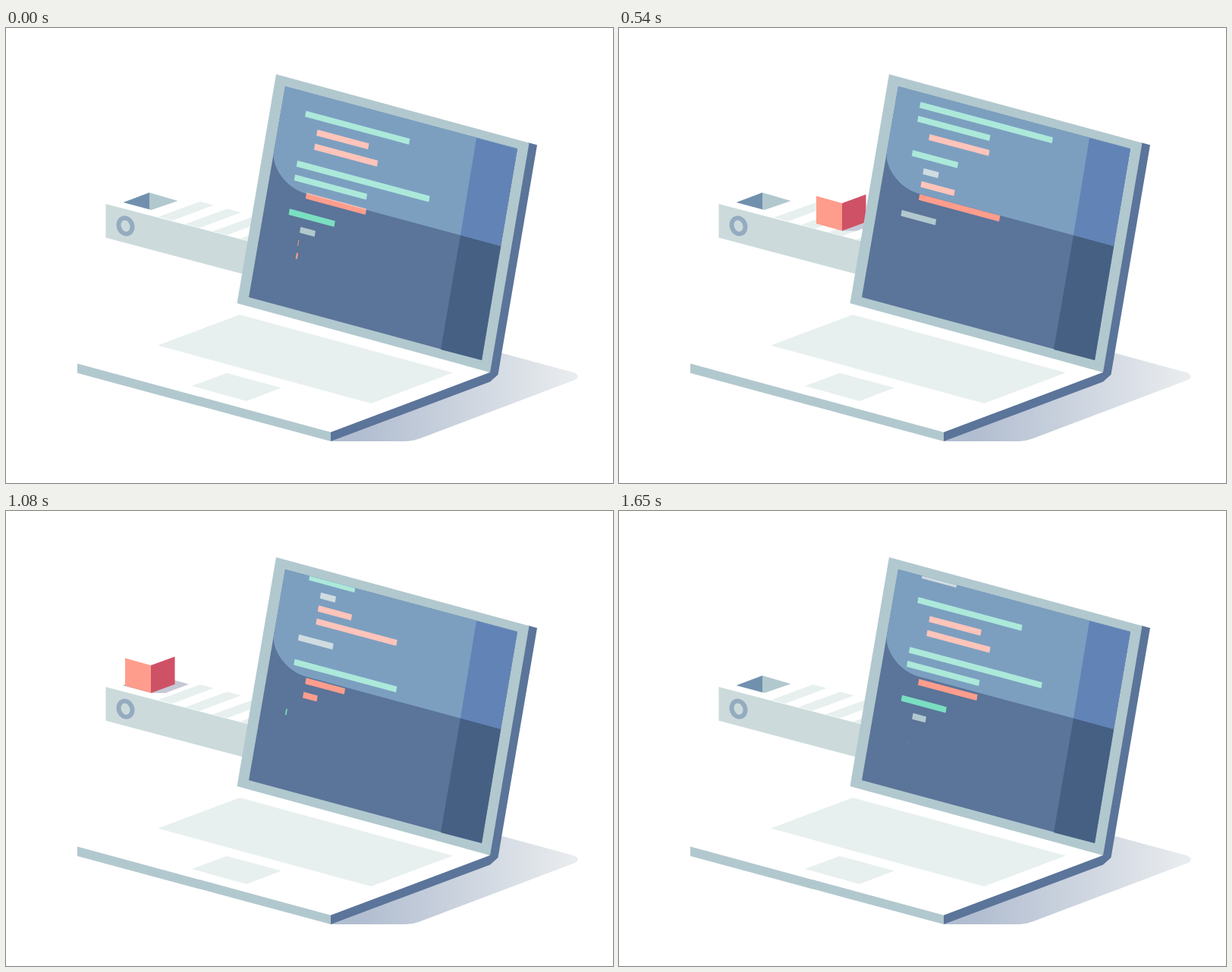
Write an HTML page that moves like this. It is 800 px wide and 600 px high and loops after 1.68 s.

```html
<!DOCTYPE html>
<html lang="en">
<head>
<meta charset="utf-8">
<title>Laptop and conveyor</title>
<style>
  html, body { margin: 0; width: 100%; height: 100%; overflow: hidden; background: #fff; }
  svg { display: block; width: 800px; height: 600px; }
</style>
</head>
<body>
<svg viewBox="0 0 800 600">
  <defs>
    <linearGradient id="fade" gradientUnits="userSpaceOnUse" x1="465" y1="0" x2="754" y2="0">
      <stop stop-color="#b1bdd0"/><stop offset="1" stop-color="#eaedef"/>
    </linearGradient>
    <clipPath id="beltClip"><path d="M255.5 228.5L345 252.500V288L318 281L199.500 249.500Z"/></clipPath>
    <clipPath id="holeClip"><path d="M155 100V230L191.500 240L226 228V100Z"/></clipPath>
    <clipPath id="screenClip"><path d="M368 77L674 159L627 438L320 355Z"/></clipPath>
    <clipPath id="glareClip"><path id="glareShape" d="M368 77L674 159L652 287.500L398 219C368 212 350 182 353 163Z"/></clipPath>
  </defs>

  <path fill="url(#fade)" d="M640 425L749 454.500Q758 459 750 464L545 541.500Q536 545 527 545H428Z"/>

  <!-- conveyor -->
  <path fill="#ccdadb" d="M131.500 232L330 284V329L131.500 276.500Z"/>
  <ellipse cx="157.500" cy="261" rx="8.700" ry="10.700" transform="rotate(-20 157.5 261)" fill="none" stroke="#94abc0" stroke-width="6"/>
  <g clip-path="url(#beltClip)"><path id="stripes" fill="#e7f0ef"/></g>
  <path fill="#b1c8ce" d="M189 217L226.500 228L191.500 240L188 239Z"/>
  <path fill="#7190ae" d="M154.500 230L189 217V239.300Z"/>
  <g id="cubeFrame">
    <path id="cubeShadow" fill="#c6c8d5"/>
    <g id="cube">
      <path fill="#fff" d="M157 194L189 182.500L222.500 192L191 203.500Z"/>
      <path fill="#ff9d8c" d="M157 194L191 203.500V240L157 230.500Z"/>
      <path fill="#cf5166" d="M191 203.500L222.500 192V228.500L191 240Z"/>
    </g>
  </g>

  <!-- laptop -->
  <path fill="#5b7499" d="M688 151L700 154.300L648.500 457L638 466.500L428 545V532L636 453Z"/>
  <path fill="#fff" d="M304.500 363L638 454L428 533L94 443Z"/>
  <path fill="#b1c8ce" d="M94 442.500L428 533V545L94 455Z"/>
  <path fill="#e7f0ef" d="M308 378L589 454.500L481 495L200 418.500ZM291 455L363 474.500L317 492L245 472Z"/>
  <path fill="#b1c8ce" d="M356 61L689.500 151.500L638 454L304.500 363Z"/>
  <path fill="#5b7499" d="M368 77L674 159L627 438L320 355Z"/>
  <use href="#glareShape" fill="#7c9fc0"/>
  <path fill="#6283b6" d="M620 145L674 159.500L652 287.500L599 273Z"/>
  <path fill="#456083" d="M599 273L652 287.500L627 438L573 424Z"/>
  <g clip-path="url(#screenClip)"><g id="bars"></g></g>
  <g clip-path="url(#screenClip)"><g clip-path="url(#glareClip)"><use href="#glareShape" fill="#7c9fc0"/><path fill="#6283b6" d="M620 145L674 159.500L652 287.500L599 273Z"/><g id="glareBars"></g></g></g>
</svg>
<script>
const LOOP = 1680, STEP = 30;
const SLOPE = 0.268;
const LIST_HEIGHT = 240.8, SCROLL = LIST_HEIGHT / LOOP;
const STRIPE_PERIOD = 36;

// [dark-area colour, light-area colour]
const GREEN = ['#7adfc1', '#ace9da'];
const PINK = ['#ff9d8c', '#ffc4ba'];
const GREY = ['#b1c8ce', '#cfdce0'];

// x, y at time 0, full width, colours, growth start, growth duration
const LINES = [
  [31.5, 23.8, 137, GREEN, 645, 470],
  [50, 43.7, 68, PINK, 799, 414],
  [50, 62.2, 83, PINK, 956, 408],
  [31.5, 89.4, 174.5, GREEN, 1053, 470],
  [31.7, 107.7, 95, GREEN, 1224, 420],
  [50, 126.9, 79, PINK, 1285, 400],
  [32.2, 152.7, 60, GREEN, 1325, 355],
  [50, 171.9, 20, GREY, 1495, 200],
  [50, 189, 44, PINK, 1640, 470],
  [50.5, 205.9, 106, PINK, 1640, 470],
  [31.5, 232, 45.5, GREY, 82, 470]
];

const $ = id => document.getElementById(id);
const mod = (a, n) => ((a % n) + n) % n;
const ease = (t, start, end) => {
  const x = Math.min(1, Math.max(0, (t - start) / (end - start)));
  return x * x * (3 - 2 * x);
};

function makeBar(parent, fill) {
  const rect = document.createElementNS('http://www.w3.org/2000/svg', 'rect');
  rect.setAttribute('height', 7.8);
  rect.setAttribute('fill', fill);
  return parent.appendChild(rect);
}

for (const id of ['bars', 'glareBars']) {
  $(id).setAttribute('transform', `matrix(1 ${SLOPE} -0.1727 1 368 77)`);
}
const bars = LINES.map(([x, y, width, colours, start, duration]) => ({
  x, width, start, duration,
  startY: mod(y - SCROLL * start, LIST_HEIGHT),
  rects: [makeBar($('bars'), colours[0]), makeBar($('glareBars'), colours[1])]
}));

let stripePath = '';
for (let i = 0; i < 6; i++) {
  const x = i * STRIPE_PERIOD;
  stripePath += `M${256 + x} ${228.7 + x * SLOPE}l18 4.8l-55 20.5l-19 -5z`;
}
$('stripes').setAttribute('d', stripePath);

function draw(t) {
  for (const bar of bars) {
    const age = mod(t - bar.start, LOOP);
    for (const rect of bar.rects) {
      rect.setAttribute('x', bar.x);
      rect.setAttribute('y', bar.startY - SCROLL * age);
      rect.setAttribute('width', bar.width * ease(age, 0, bar.duration));
    }
  }

  const travel = mod(4 * STRIPE_PERIOD * ease(t, 60, 1056), STRIPE_PERIOD);
  $('stripes').setAttribute('transform', `translate(${-travel} ${-travel * SLOPE})`);

  const away = 206 * (1 - ease(t, 30, 1050));
  const drop = 54 * ease(t, 1080, 1380);
  const reach = 19 * Math.max(0, 1 - drop / 37);
  $('cubeFrame').setAttribute('clip-path', drop > 0 ? 'url(#holeClip)' : 'none');
  $('cubeFrame').style.display = t > 1440 ? 'none' : '';
  $('cube').setAttribute('transform', `translate(${away} ${away * SLOPE + drop})`);
  $('cubeShadow').setAttribute('transform', `translate(${away} ${away * SLOPE})`);
  $('cubeShadow').setAttribute('d', reach > 0
    ? `M191 240h${reach}L${222 + reach} 228.500L222 223Z` : '');
  // the shadow reaches past the hole, so it is clipped only once it is gone
  if (drop > 0 && reach > 0) $('cubeFrame').setAttribute('clip-path', 'none');
  $('cube').setAttribute('clip-path', 'none');
  if (drop > 0 && reach > 0) clipCube(drop);
}

// Keeps the sinking cube inside the hole while its shadow stays free.
function clipCube(drop) {
  $('sinkShape').setAttribute('transform', `translate(0 ${-drop})`);
  $('cube').setAttribute('clip-path', 'url(#sinkClip)');
}
document.querySelector('defs').insertAdjacentHTML('beforeend',
  '<clipPath id="sinkClip"><path id="sinkShape" d="M155 100V230L191.500 240L226 228V100Z"/></clipPath>');

function tick() {
  draw(Math.floor((performance.now() % LOOP) / STEP) * STEP);
  requestAnimationFrame(tick);
}
tick();
</script>
</body>
</html>
```
